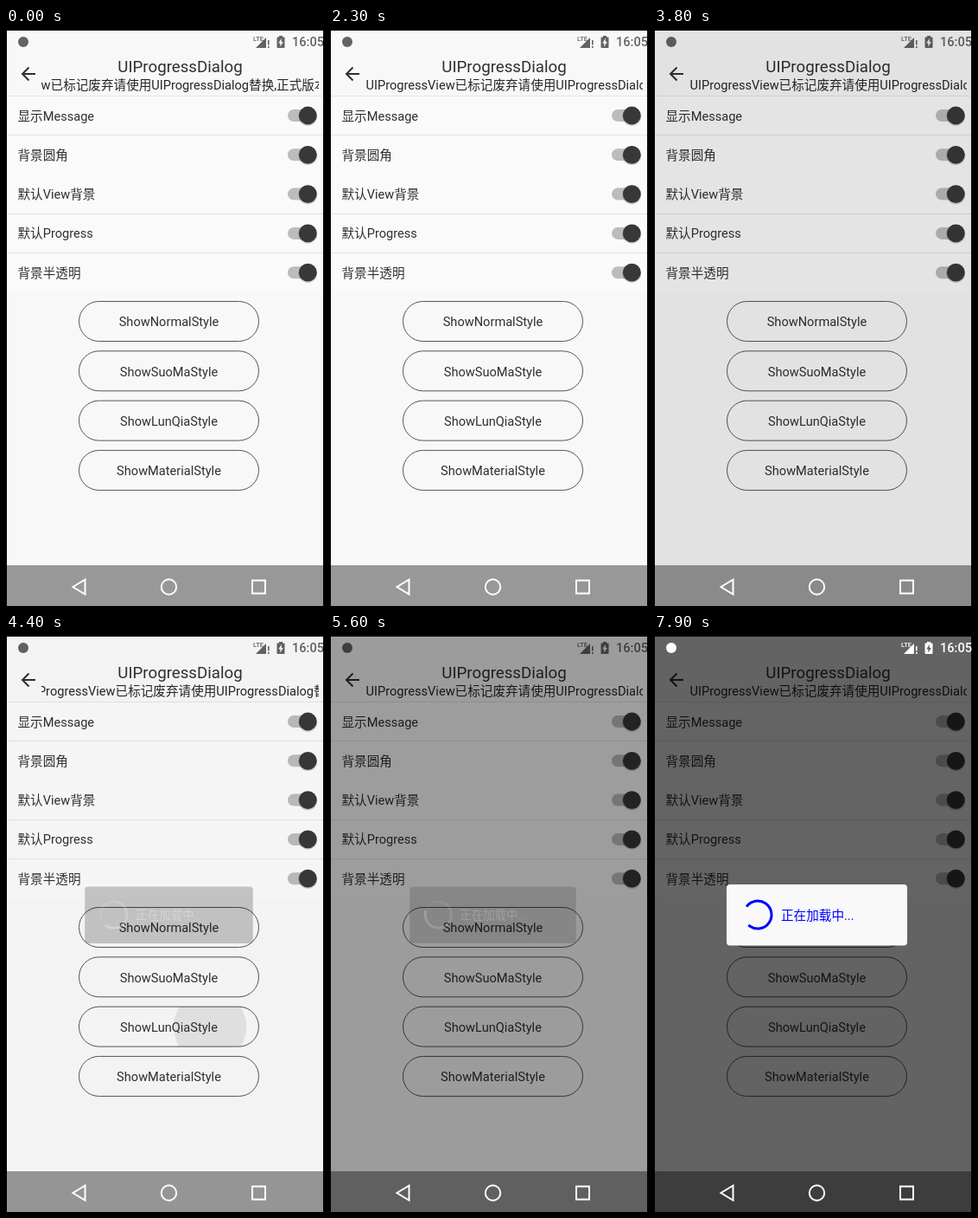
These frames come from a looping animation (368 px wide and 667 px high, 8 s). An HTML page with a canvas:

```html
<!DOCTYPE html>
<html lang="zh-CN">
<head>
<meta charset="utf-8">
<style>
html, body { margin: 0; width: 100%; height: 100%; overflow: hidden; background: #000; }
canvas { display: block; }
</style>
</head>
<body>
<canvas id="stage" width="368" height="667"></canvas>
<script>
const c = document.getElementById('stage').getContext('2d');
const LOOP = 8000, TAU = Math.PI * 2, DEG = Math.PI / 180;
const FAMILY = 'Roboto, "Noto Sans CJK SC", "Noto Sans CJK", sans-serif';
const NOTICE = 'UIProgressView已标记废弃请使用UIProgressDialog替换,正式版本将会移除该控件';
const ROWS = ['显示Message', '背景圆角', '默认View背景', '默认Progress', '背景半透明'];
const BUTTONS = ['ShowNormalStyle', 'ShowSuoMaStyle', 'ShowLunQiaStyle', 'ShowMaterialStyle'];
const DIALOGS = [
  { start: 1290, end: 1900, ripple: 0, draw: normalDialog },
  { start: 2813, end: 3460, ripple: 1, draw: petalDialog },
  { start: 4367, end: 5450, ripple: 2, draw: ringDialog },
  { start: 6370, end: 9000, draw: materialDialog },
];

const clamp = x => Math.max(0, Math.min(1, x));
const decelerate = x => 1 - (1 - clamp(x)) ** 2;
const rowY = i => 101 + i * 45.3;
const buttonY = i => 338.5 + i * 57.3;

function text(s, x, y, color = '#303030', size = 14.6, align = 'left', weight = 400) {
  c.font = `${weight} ${size}px ${FAMILY}`;
  c.textAlign = align;
  c.fillStyle = color;
  c.fillText(s, x, y);
}

function rect(x, y, w, h, color) {
  c.fillStyle = color;
  c.fillRect(x, y, w, h);
}

function shape(build, fill, stroke, width = 1) {
  c.beginPath();
  build();
  if (fill) { c.fillStyle = fill; c.fill(); }
  if (stroke) { c.strokeStyle = stroke; c.lineWidth = width; c.stroke(); }
}

const circle = (x, y, r, fill, stroke, width) =>
  shape(() => c.arc(x, y, r, 0, TAU), fill, stroke, width);
const round = (x, y, w, h, r, fill, stroke) =>
  shape(() => c.roundRect(x, y, w, h, r), fill, stroke);
const poly = (points, close, fill, stroke, width) => shape(() => {
  points.forEach(([x, y]) => c.lineTo(x, y));
  if (close) c.closePath();
}, fill, stroke, width);

function noticeOffset(t) {
  if (t < DIALOGS[0].start + 60) return 93 + t * 0.04;
  for (let i = 1; i < DIALOGS.length; i++) {
    const from = DIALOGS[i - 1].end + 490;
    if (t > from && t < DIALOGS[i].start + 60) return (t - from) * 0.04;
  }
  return 0;
}

function page(t) {
  rect(1, 3, 366, 664, '#f8f8f8');
  rect(1, 79, 366, 226, '#fafafa');
  poly([[26.5, 45.5], [19, 53], [26.5, 60.5]], false, null, '#303030', 2);
  poly([[19, 53], [34, 53]], false, null, '#303030', 2);
  text('UIProgressDialog', 201.5, 50.7, '#303030', 18.7, 'center');

  c.save();
  c.beginPath();
  c.rect(41, 56, 321, 21);
  c.clip();
  text(NOTICE, 41.5 - noticeOffset(t), 71, '#262626');
  c.restore();

  for (const y of [78, 123, 214, 259]) rect(1, y, 366, 1, '#e4e4e4');
  ROWS.forEach((label, i) => {
    const y = rowY(i);
    text(label, 13.5, y + 5.5);
    round(326, y - 7, 30, 14, 7, '#bcbcbc');
    circle(349.3, y + 1, 10.8, 'rgba(0,0,0,.2)');
    circle(349.3, y, 10.4, '#383838');
  });

  BUTTONS.forEach((label, i) => {
    const y = buttonY(i);
    round(84.5, y - 23, 208, 46, 23, null, '#555');
    ripple(i, t);
    text(label, 188.5, y + 5.7, '#303030', 14.6, 'center');
  });
  rect(1, 620, 366, 47, '#989898');
}

function ripple(i, t) {
  const d = DIALOGS.find(d => d.ripple === i);
  if (!d) return;
  const age = t - d.start, q = clamp((age + 67) / 254), y = buttonY(i);
  const fade = 1 - clamp((age - 250) / 200);
  if (!q || !fade) return;
  c.save();
  c.beginPath();
  c.roundRect(84.5, y - 23, 208, 46, 23);
  c.clip();
  circle(245 - 56.5 * q * q, y, 106 * q, `rgba(0,0,0,${0.085 * fade})`);
  c.restore();
}

function systemIcons(light) {
  const ink = light > 0.5 ? `rgba(255,255,255,${light * 2 - 1})` : `rgba(0,0,0,${0.6 * (1 - light * 2)})`;
  circle(20, 16, 6, ink);
  text('LTE', 286, 15, ink, 7.5, 'left', 500);
  poly([[301, 11], [301, 23], [289, 23]], true, ink);
  rect(303, 14, 1.6, 5.5, ink);
  rect(303, 21, 1.6, 2, ink);
  shape(() => {
    c.roundRect(313.5, 10.5, 9, 12.5, 1);
    c.rect(316, 9, 4, 1.5);
    [[318.8, 12], [315.3, 17.4], [317.3, 17.4], [317.3, 21.4], [320.8, 16], [318.8, 16]]
      .forEach(([x, y], i) => i ? c.lineTo(x, y) : c.moveTo(x, y));
    c.closePath();
  }, ink);
  text('16:05', 331, 21.2, ink, 14.6, 'left', 500);

  poly([[91.5, 636.5], [91.5, 653.5], [77.5, 645]], true, null, '#fff', 2);
  circle(188.5, 645, 8.7, null, '#fff', 2);
  c.strokeRect(285, 637.5, 15, 15);
}

// Indeterminate arc: the head runs ahead, then the tail catches up.
function trimArc(ms, r, width, color) {
  const ease = x => 1 - (1 - clamp(x) ** 2) ** 5;
  const u = (ms / 1333) % 1;
  const base = -90 + 90 * u + 0.13 * ms;
  const tail = base + 270 * ease(u * 2 - 1), head = base + 270 * ease(u * 2) + 6;
  shape(() => c.arc(120, 324, r, tail * DEG, head * DEG), null, color, width);
}

function wideBox(fill, ink) {
  round(84, 289, 209, 70.5, 4, fill);
  text('正在加载中...', 147, 329.5, ink);
}

function normalDialog(t) {
  wideBox('#f9f9f9', '#444');
  trimArc(Math.max(0, t - 1345) * 1.28, 14, 3.5, '#333');
}

function materialDialog(t) {
  wideBox('#f9f9f9', '#00f');
  trimArc(Math.max(0, t - 6336) * 1.28, 16, 3, '#00f');
}

function petalDialog(t) {
  round(110, 267, 156, 114, 4, 'rgba(0,0,0,.67)');
  const step = Math.floor(t / 100);
  for (let i = 0; i < 12; i++) {
    const a = (i + 5 + step) * 30 * DEG, x = Math.cos(a), y = Math.sin(a);
    c.lineCap = 'round';
    poly([[188.5 + 11 * x, 305.5 + 11 * y], [188.5 + 17.5 * x, 305.5 + 17.5 * y]],
      false, null, `rgba(255,255,255,${0.35 + 0.6 * i / 11})`, 3.4);
    c.lineCap = 'butt';
  }
  text('正在加载中...', 188.5, 348, '#fff', 14.6, 'center');
}

function ringDialog(t) {
  wideBox('rgba(0,0,0,.67)', '#fff');
  const g = c.createConicGradient((t - 4400) / 1000 * TAU + 2.2, 120, 324);
  g.addColorStop(0, 'rgba(255,255,255,.1)');
  g.addColorStop(1, '#fff');
  circle(120, 324, 16.5, null, g, 3);
}

function render(t) {
  rect(0, 0, 368, 667, '#000');
  page(t);
  const d = DIALOGS.find(d => t >= d.start && t < d.end + 400);
  if (!d) return systemIcons(0);

  const age = t - d.start, left = t - d.end;
  const dim = 0.6 * clamp(Math.min((age - 20) / 400, 1 - left / 400));
  rect(1, 3, 366, 664, `rgba(0,0,0,${dim})`);
  systemIcons(clamp(Math.min((age - 230) / 170, 1 - left / 120)));

  const shown = left < 0 ? decelerate(age / 200) : 1 - decelerate(left / 280);
  const scale = 0.9 + 0.1 * shown;
  c.save();
  c.globalAlpha = shown;
  c.translate(188.5, 324);
  c.scale(scale, scale);
  c.translate(-188.5, -324);
  d.draw(t);
  c.restore();
}

const began = performance.now();
function tick() {
  render((performance.now() - began) % LOOP);
  requestAnimationFrame(tick);
}
tick();
</script>
</body>
</html>
```
